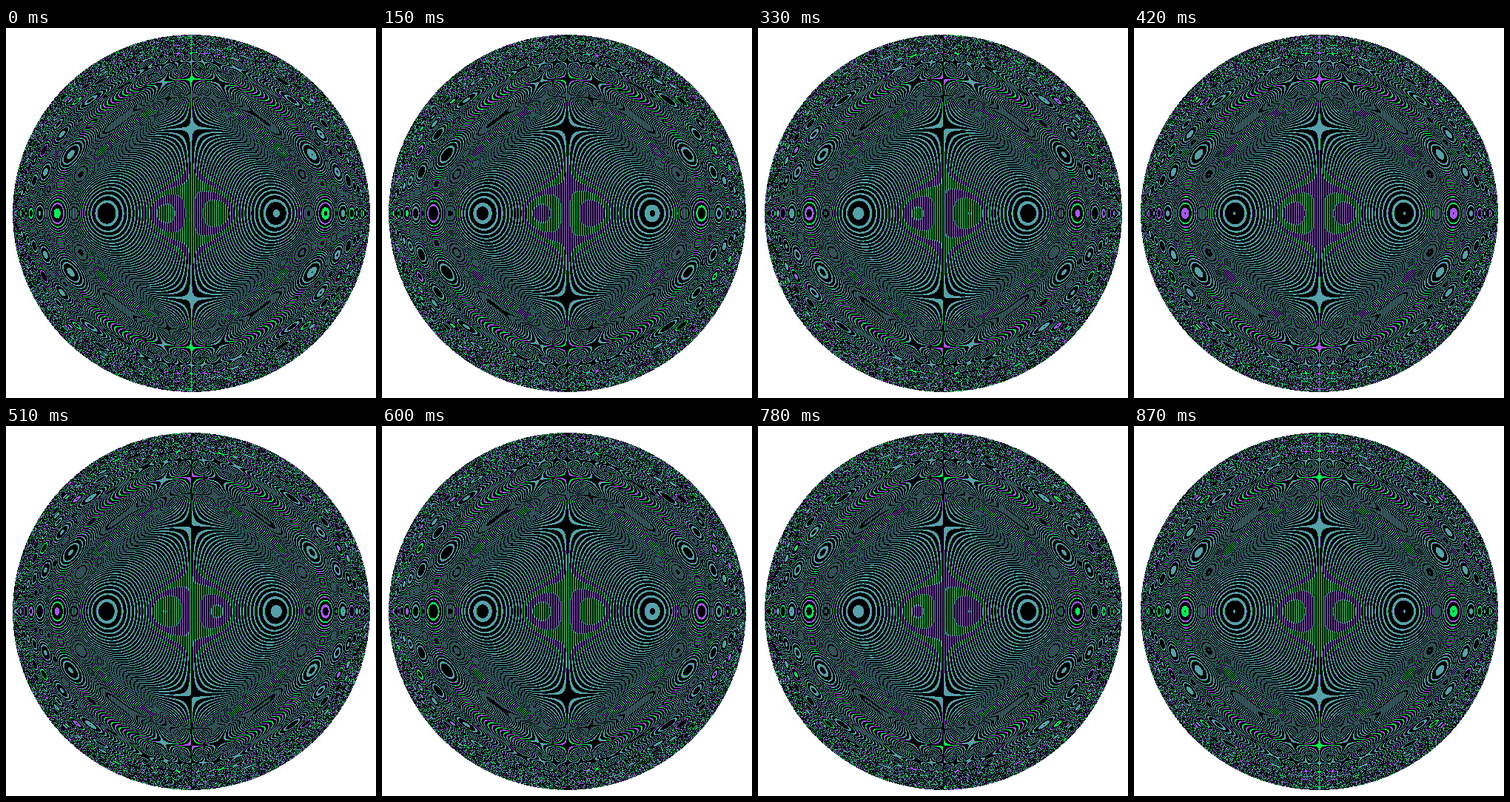
An HTML page with a canvas for the animation above (900 ms loop, 500 by 500 pixels).

```html
<!DOCTYPE html>
<html>
<head>
<meta charset="utf-8">
<style>
html, body { margin: 0; width: 100%; height: 100%; overflow: hidden; background: #fff; }
canvas { display: block; width: 500px; height: 500px; image-rendering: pixelated; }
</style>
</head>
<body>
<canvas id="c" width="500" height="500"></canvas>
<script>
// A sphere wrapped in thousands of meridian stripes, too fine for the pixel grid.
const SIZE = 500, MID = 250, RADIUS = 241.36, STRIPES = 2000;
const HALF = 0.09, LOOP = 900, STEP = 30, START = 870;
const rgb = (r, g, b) => (255 << 24 | b << 16 | g << 8 | r) >>> 0;
const BLACK = rgb(0, 0, 0), GREEN = rgb(0, 238, 85), PURPLE = rgb(170, 85, 255);

const ctx = document.getElementById('c').getContext('2d');
const image = ctx.createImageData(SIZE, SIZE);
const pixels = new Uint32Array(image.data.buffer).fill(rgb(255, 255, 255));

// Stripe phase of every pixel on the disc
const spots = [], phases = [];
for (let j = 0; j < SIZE; j++) {
  for (let i = 0; i < SIZE; i++) {
    const x = i - MID, y = j - MID;
    const depth = RADIUS * RADIUS - x * x - y * y;
    if (depth < 0) continue;
    spots.push(j * SIZE + i);
    phases.push(Math.atan2(x, Math.sqrt(depth)) * STRIPES / (2 * Math.PI));
  }
}

function colour(phase) {
  const p = phase - Math.floor(phase);
  if (p < HALF || p > 1 - HALF) return GREEN;
  return Math.abs(p - 0.5) < HALF ? PURPLE : BLACK;
}

function draw(ms) {
  const t = Math.floor(ms % LOOP / STEP) * STEP;
  const turn = (t - START) / LOOP;
  for (let k = 0; k < spots.length; k++) pixels[spots[k]] = colour(phases[k] - turn);
  ctx.putImageData(image, 0, 0);
}

let begin, last = -1;
function tick(now) {
  if (begin === undefined) begin = now;
  const step = Math.floor((now - begin) / STEP);
  if (step !== last) draw(step * STEP);
  last = step;
  requestAnimationFrame(tick);
}
draw(0);
requestAnimationFrame(tick);
</script>
</body>
</html>
```
